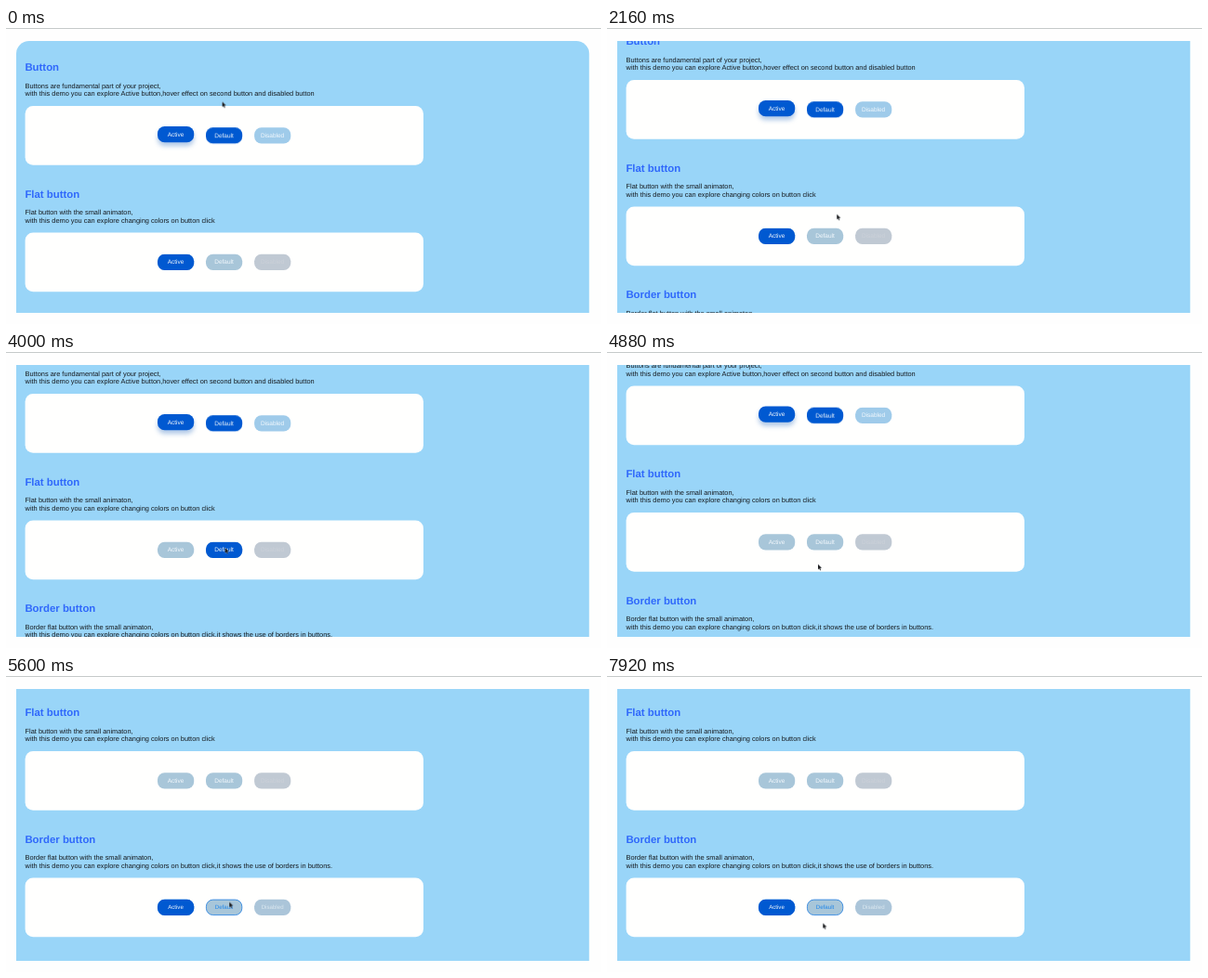
Write an HTML page that moves like this. It is 640 by 319 pixels and loops after 8000 ms.

```html
<!DOCTYPE html>
<html lang="en">
<head>
<meta charset="utf-8">
<title>Button demo</title>
<style>
  :root { --blue: #0059d1; --grey: #a8c6d9; }
  html, body { margin: 0; width: 100%; height: 100%; overflow: hidden; background: #fefefe; }
  svg { display: block; }
  text {
    font: 7.38px "Liberation Sans", Arial, sans-serif;
    fill: #15191d;
    text-rendering: geometricPrecision;
  }
  .title { font-size: 11.4px; font-weight: bold; fill: #3069fb; }
  .btn text { font-size: 6.5px; fill: #f4f9fd; text-anchor: middle; }
  .outline text { font-size: 6.15px; }
  .card { fill: #fffffe; }
  .on { fill: var(--blue); }
  .off { fill: var(--grey); }
  .edge { fill: var(--grey); stroke: #1f7de0; stroke-width: .8; }
  .outline .blue { fill: #1f86ea; }
  .raised { transform: translateY(-1.2px); filter: drop-shadow(0 4.5px 2.5px rgba(40, 105, 190, .36)); }

  /* 1% of the loop is one 80 ms tick */
  .anim { animation: 8s step-end -4ms infinite; }
  .scroll { animation-name: scroll; }
  .pointer { animation-name: pointer; }
  .lift { animation-name: lift; }
  .flat-a { animation-name: flat-a; }
  .flat-d { animation-name: flat-d; }
  .line-a { animation-name: line-a; }
  .line-d { animation-name: line-d; }

  @keyframes scroll {
    0% { transform: translateY(0); }
    26% { transform: translateY(-7px); }
    27% { transform: translateY(-28px); }
    28% { transform: translateY(-39px); }
    61% { transform: translateY(-47.5px); }
    62% { transform: translateY(-86px); }
    63% { transform: translateY(-122.5px); }
    64%, 100% { transform: translateY(-139.5px); }
  }
  @keyframes lift {
    0%, 15%, 22%, 100% { transform: none; filter: none; }
    14%, 21% { transform: translateY(-1.2px); filter: drop-shadow(0 4.5px 2.5px rgba(40, 105, 190, .36)); }
  }
  @keyframes flat-a {
    0% { opacity: 1; }
    47% { opacity: .4; }
    48%, 100% { opacity: 0; }
  }
  @keyframes flat-d {
    0%, 55%, 100% { opacity: 0; }
    38%, 54% { opacity: .37; }
    39% { opacity: 1; }
  }
  @keyframes line-a {
    0%, 97%, 100% { opacity: 1; }
    82%, 96% { opacity: .4; }
    83% { opacity: 0; }
  }
  @keyframes line-d {
    0%, 90%, 100% { opacity: 0; }
    75%, 89% { opacity: .4; }
    76% { opacity: 1; }
  }
  @keyframes pointer {
    0% { transform: translate(232.6px, 79.5px); }
    2% { transform: translate(232.6px, 79.5px); animation-timing-function: steps(4); }
    6% { transform: translate(272px, 51.5px); animation-timing-function: steps(3); }
    9% { transform: translate(295px, 70px); animation-timing-function: steps(4); }
    13% { transform: translate(248px, 101.7px); }
    14% { transform: translate(232px, 111px); animation-timing-function: steps(2); }
    16% { transform: translate(168.5px, 115px); }
    17% { transform: translate(178.7px, 112px); }
    19% { transform: translate(178.7px, 112px); animation-timing-function: steps(2); }
    21% { transform: translate(230px, 117px); }
    22% { transform: translate(245px, 140px); }
    23% { transform: translate(249px, 175px); }
    24% { transform: translate(247.2px, 200.7px); }
    31% { transform: translate(247.2px, 200.7px); animation-timing-function: steps(2); }
    33% { transform: translate(236.4px, 209px); }
    38% { transform: translate(236.4px, 209px); animation-timing-function: steps(4); }
    42% { transform: translate(188.5px, 211px); }
    47% { transform: translate(188.5px, 211px); animation-timing-function: steps(3); }
    50% { transform: translate(235.6px, 211px); }
    55% { transform: translate(235.6px, 211px); animation-timing-function: steps(4); }
    59% { transform: translate(227px, 228.8px); }
    67% { transform: translate(227px, 228.8px); animation-timing-function: steps(3); }
    70% { transform: translate(240.2px, 243.6px); }
    75% { transform: translate(240.2px, 243.6px); animation-timing-function: steps(3); }
    78% { transform: translate(181.5px, 248px); }
    82% { transform: translate(181.5px, 248px); animation-timing-function: steps(3); }
    85% { transform: translate(229.8px, 251px); }
    89% { transform: translate(229.8px, 251px); animation-timing-function: steps(4); }
    93% { transform: translate(186.5px, 250px); }
    96% { transform: translate(186.5px, 250px); animation-timing-function: steps(3); }
    99%, 100% { transform: translate(232.3px, 266.4px); }
  }
</style>
</head>
<body>
<svg width="640" height="319" viewBox="0 0 640 319">
  <defs>
    <rect id="pill" width="39.2" height="17.3" rx="7.6"/>
    <rect id="ring" x=".4" y=".4" width="38.4" height="16.5" rx="7.3"/>
    <rect id="card" class="card" x="20.6" y="84" width="428.4" height="63.8" rx="8.5"/>
  </defs>

  <rect width="640" height="319" fill="#fefefe"/>
  <rect width="640" height="1" fill="#c6caca"/>

  <svg x="11" y="14" width="616.3" height="292.6" viewBox="11 14 616.3 292.6">
    <g class="anim scroll">
      <rect x="11" y="14" width="616.3" height="700" rx="14" fill="#99d5f8"/>

      <g>
        <text class="title" x="20.4" y="46.4">Button</text>
        <text x="20.6" y="64.6">Buttons are fundamental part of your project,</text>
        <text x="20.6" y="73.3">with this demo you can explore Active button,hover effect on second button and disabled button</text>
        <use href="#card"/>
        <g class="btn" transform="translate(163 107.2)">
          <g class="raised"><use href="#pill" class="on"/><text x="19.5" y="10.6">Active</text></g>
        </g>
        <g class="btn" transform="translate(215 107.2)">
          <g class="anim lift"><use href="#pill" class="on"/><text x="19.5" y="10.6">Default</text></g>
        </g>
        <g class="btn" transform="translate(267.1 107.2)">
          <use href="#pill" fill="#9fcbea"/><text x="19.5" y="10.6">Disabled</text>
        </g>
      </g>

      <g transform="translate(0 136.5)">
        <text class="title" x="20.4" y="46.4">Flat button</text>
        <text x="20.6" y="64.6">Flat button with the small animaton,</text>
        <text x="20.6" y="73.3">with this demo you can explore changing colors on button click</text>
        <use href="#card"/>
        <g class="btn" transform="translate(163 107.2)">
          <use href="#pill" class="off"/><text x="19.5" y="10.6">Active</text>
          <g class="anim flat-a"><use href="#pill" class="on"/><text x="19.5" y="10.6">Active</text></g>
        </g>
        <g class="btn" transform="translate(215 107.2)">
          <use href="#pill" class="off"/><text x="19.5" y="10.6">Default</text>
          <g class="anim flat-d"><use href="#pill" class="on"/><text x="19.5" y="10.6">Default</text></g>
        </g>
        <g class="btn" transform="translate(267.1 107.2)">
          <use href="#pill" fill="#c0c9d3"/><text x="19.5" y="10.6" style="fill:#cbd1d9">Disabled</text>
        </g>
      </g>

      <g transform="translate(0 273)">
        <text class="title" x="20.4" y="46.4">Border button</text>
        <text x="20.6" y="64.6">Border flat button with the small animaton,</text>
        <text x="20.6" y="73.3">with this demo you can explore changing colors on button click,it shows the use of borders in buttons.</text>
        <use href="#card"/>
        <g class="btn outline" transform="translate(163 107.2)">
          <use href="#ring" class="edge"/><text class="blue" x="19.5" y="10.5">Active</text>
          <g class="anim line-a"><use href="#pill" class="on"/><text x="19.5" y="10.5">Active</text></g>
        </g>
        <g class="btn outline" transform="translate(215 107.2)">
          <use href="#ring" class="edge"/><text class="blue" x="19.5" y="10.5">Default</text>
          <g class="anim line-d"><use href="#pill" class="on"/><text x="19.5" y="10.5">Default</text></g>
        </g>
        <g class="btn outline" transform="translate(267.1 107.2)">
          <use href="#pill" fill="#abc5d9"/><text x="19.5" y="10.5" style="fill:#dce8f0">Disabled</text>
        </g>
      </g>
    </g>
  </svg>

  <path class="anim pointer" d="M0 0V5.6L1.3 4.4L2.2 6.4L3.1 6L2.2 4.1H4Z" fill="#1c1c1e" stroke="#dfeaf2" stroke-width=".35" paint-order="stroke"/>
</svg>
</body>
</html>
```
